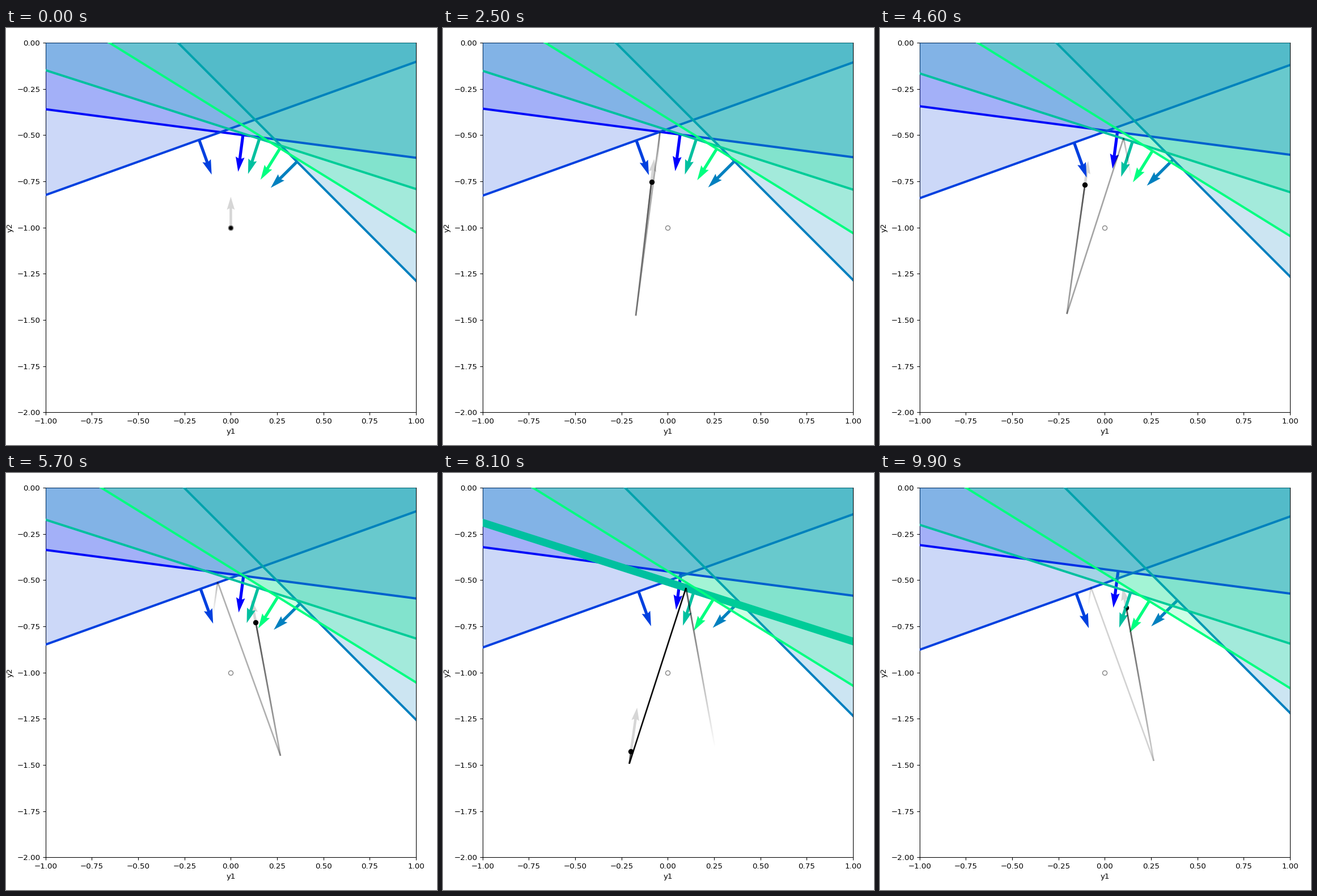
A matplotlib script that plays this animation: 760x737 px, repeating every 10 s.

```python
import numpy as np
import matplotlib.pyplot as plt
from matplotlib.animation import FuncAnimation
from matplotlib.collections import LineCollection

W, H, DPI = 760, 737, 96
FRAMES, INTERVAL = 100, 100
DT = 0.001                  # simulation step in seconds, leak time constant is 1 s
STEPS = 100                 # simulation steps per frame
TRAIL = 1000                # trail length in steps

CENTER = np.array([0.0, -1.0])
SLOPES = np.array([-0.1313, 0.3605, -1.0025, -0.3214, -0.62])
DRIFT = np.array([1, -1, 1, -1, -1])
UP = np.stack([-SLOPES, np.ones(5)], axis=1) / np.hypot(SLOPES, 1)[:, None]
COLORS = plt.cm.winter(np.linspace(0, 1, 5))


def thresholds(t):
    """Distance of each boundary from the centre; drifts after two seconds."""
    return 0.5045 + DRIFT * 0.05 * max(0.0, t - 2) / 8


def simulate():
    y = CENTER.copy()
    path, spikes = [y], []
    for n in range(1, FRAMES * STEPS):
        y = y * np.exp(-DT)
        over = UP @ (y - CENTER) - thresholds(n * DT)
        i = int(np.argmax(over))
        if over[i] > 0:
            y = y - UP[i]
            spikes.append((n, i))
        path.append(y)
    return np.array(path), spikes


path, spikes = simulate()

fig = plt.figure(figsize=(W / DPI, H / DPI), dpi=DPI, facecolor="white")
left, top, side = 69.7, 26.0, 653.4
ax = fig.add_axes([left / W, 1 - (top + side) / H, side / W, side / H])
ax.set(xlabel="y1", ylabel="y2")
ticks = np.linspace(-1, 1, 9)
ax.set_xticks(ticks)
ax.set_yticks(ticks - 1)


def arrow(color, scale, width, z, **kw):
    return ax.quiver([0], [0], [0], [1], color=[color], scale=scale,
                     scale_units="width", units="width", width=width,
                     zorder=z, **kw)


leak = arrow("black", 12, 0.007, 1, alpha=0.16)
dot, = ax.plot([], [], "o", color="black", ms=6, zorder=2)
ax.plot(*CENTER, "o", mfc="none", mec="gray", ms=6, zorder=2.1)

xs = np.array([-1.2, 1.2])
fills, lines, arrows = [], [], []
for i, c in enumerate(COLORS):
    z = 3 + 0.1 * i
    fills += ax.fill([0, 1, 1], [0, 0, 1], fc=c, alpha=0.2, lw=0, zorder=z)
    lines += ax.plot([], [], color=c, zorder=z + 0.02)
    arrows.append(arrow(c, 10, 0.008, z + 0.04))
    arrows[i].set_UVC([-UP[i, 0]], [-UP[i, 1]])

trail = LineCollection([], linewidths=2, zorder=4)
ax.add_collection(trail, autolim=False)
ax.set(xlim=(-1, 1), ylim=(-2, 0))


def update(k):
    n = k * STEPS
    pos = path[n]
    dot.set_data([pos[0]], [pos[1]])
    leak.set_offsets([pos])
    leak.set_UVC([-pos[0]], [-pos[1]])

    pts = path[max(0, n - TRAIL):n + 1]
    trail.set_segments(np.stack([pts[:-1], pts[1:]], axis=1))
    rgba = np.zeros((len(pts) - 1, 4))
    rgba[:, 3] = 1 - np.arange(len(rgba))[::-1] / TRAIL
    trail.set_color(rgba)

    firing = {i for s, i in spikes if n - STEPS < s <= n}
    feet = CENTER + thresholds(n * DT)[:, None] * UP
    for i, (fx, fy) in enumerate(feet):
        ys = fy + SLOPES[i] * (xs - fx)
        lines[i].set_data(xs, ys)
        lines[i].set_linewidth(10 if i in firing else 3)
        fills[i].set_xy([(xs[0], ys[0]), (xs[1], ys[1]), (xs[1], 2), (xs[0], 2)])
        arrows[i].set_offsets([(fx, fy)])
    return [leak, trail, dot, *fills, *lines, *arrows]


anim = FuncAnimation(fig, update, frames=FRAMES, interval=INTERVAL,
                     repeat=True, repeat_delay=0, blit=False)
plt.show()
```
